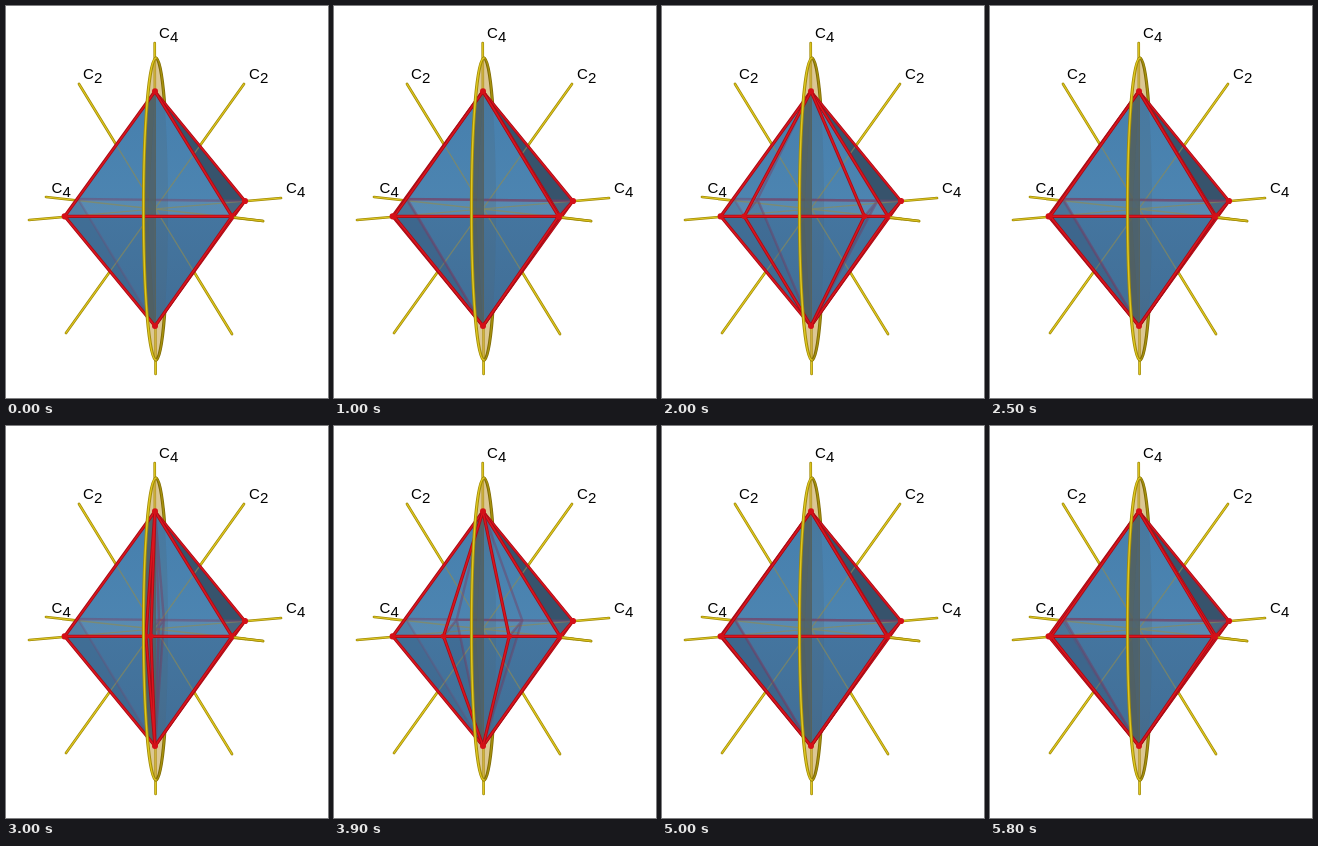
An HTML page for the animation above (5900 ms loop, 322 by 392 pixels).

```html
<!DOCTYPE html>
<html lang="en">
<head>
<meta charset="utf-8">
<title>Octahedron reflection</title>
<style>
  html, body { margin: 0; width: 100%; height: 100%; overflow: hidden; background: #fff; }
  svg { display: block; width: 322px; height: 392px; }
  text { font-family: "Liberation Sans", Arial, sans-serif; font-size: 15px; fill: #000; }
</style>
</head>
<body>
<svg id="stage" viewBox="0 0 322 392">
  <defs>
    <linearGradient id="upper" x1="0" y1="0" x2="0" y2="1">
      <stop offset="0" stop-color="#467fad"/><stop offset="1" stop-color="#4d85b1"/>
    </linearGradient>
    <linearGradient id="lower" x1="0" y1="0" x2="0" y2="1">
      <stop offset="0" stop-color="#44759f"/><stop offset="1" stop-color="#416e96"/>
    </linearGradient>
    <clipPath id="solid"><path d="M149 85L239 195L226 211L149 320L58.7 210Z"/></clipPath>
  </defs>
</svg>
<script>
const LOOP = 5900, STEP = 100;
const START = 920, PASS = 830, PASSES = 6;
const T = [149, 85.3], B = [149, 320];
const LF = [58.7, 210.3], RF = [226, 210.3], LB = [72, 193], RB = [239, 195];
const stage = document.getElementById("stage");

function add(tag, attrs, parent = stage) {
  const el = document.createElementNS("http://www.w3.org/2000/svg", tag);
  for (const k in attrs) el.setAttribute(k, attrs[k]);
  parent.appendChild(el);
  return el;
}
const group = (attrs = {}) => add("g", attrs);
const path = (...pts) => "M" + pts.map(p => p.join(" ")).join("L");
const fill = (d, color, opacity = 1) => add("path", { d, fill: color, "fill-opacity": opacity });
const line = (g, d, color, width, opacity = 1) => add("path", {
  d, fill: "none", stroke: color, "stroke-width": width, opacity,
  "stroke-linecap": "round", "stroke-linejoin": "round"
}, g);

// A shaded rod: dark body with a lighter core
function rod(g, d, dark, light, width) {
  const parts = [line(g, d, dark, width), line(g, d, light, width * 0.45)];
  return d2 => parts.forEach(p => p.setAttribute("d", d2));
}
const gold = (d, width = 2.7) => rod(stage, d, "#a18b08", "#e0c820", width);
const red = (g, d, width = 3.2) => rod(g, d, "#a80c16", "#dc141e", width);

const axes = [
  [[148.7, 37], [149.6, 368]],
  [[73, 78], [226, 328]],
  [[238, 78], [60, 327]],
  [[40, 191], [257, 215]],
  [[23, 214], [275, 192]]
];
const nearRim = "M150 52A12.5 151 0 0 0 150 354";
const farRim = "M150 52A12 151 0 0 1 150 354";

// Everything behind the solid
axes.forEach(a => gold(path(...a)));
fill(nearRim + "Z", "#c4a24e", 0.6);
fill(farRim + "Z", "#c4a24e", 0.6);
rod(stage, farRim, "#806c08", "#a8930c", 3.2);

// Solid faces
fill(path(T, LF, RF) + "Z", "url(#upper)");
fill(path(B, LF, RF) + "Z", "url(#lower)");
fill(path(T, RF, RB) + "Z", "#37536c");
fill(path(B, RF, RB) + "Z", "#3d5870");
fill(path(LF, LB, RB, RF) + "Z", "#7b9ab5", 0.25);
fill(path(LF, LB, B) + "Z", "#33506f", 0.2);

// Parts seen through the faces
const inner = group({ "clip-path": "url(#solid)" });
add("path", { d: farRim + "Z", fill: "#4d6675", "fill-opacity": 0.25 }, inner);
axes.forEach(a => line(inner, path(...a), "#8c8a55", 1.3, 0.65));
line(inner, path(LF, LB, RB, RF), "#75476f", 2.4, 0.5);
line(inner, path(LB, B, RB), "#75476f", 2.4, 0.3);
const ghost = group();
const ghostSides = add("path", { fill: "#2f4c69", "fill-opacity": 0.18 }, ghost);
const ghostLine = line(ghost, "", "#7a3358", 2.4, 0.4);

// Near half of the mirror disc
add("path", {
  d: nearRim + "Z", fill: "#545d58", "fill-opacity": 0.82, "clip-path": "url(#solid)"
});
fill(path(T, [142, 210], B, [150, 203]) + "Z", "#49647a", 0.4);

const edges = group();
red(edges, path(T, RB, B), 2.8);
red(edges, path(RF, RB), 3);
red(edges, path(LF, T, RF, B, LF, RF));

// Moving copy
const copy = group();
const setCopy = red(copy, "");
const dot = (g, p, r) => add("circle", { cx: p[0], cy: p[1], r, fill: "#d41018" }, g);
const movers = [dot(copy, LF, 2.8), dot(copy, RF, 2.8)];
[LF, RF, RB].forEach(p => dot(stage, p, 3.1));

gold(path([229, 211.5], [257, 215]));
gold(nearRim, 3.2);
[T, B].forEach(p => dot(stage, p, 3));

[["4", 153, 31.5], ["2", 77, 72.5], ["2", 243, 72.5], ["4", 45.5, 186.5], ["4", 280, 187]]
  .forEach(([n, x, y]) => {
    add("text", { x, y }).textContent = "C";
    add("text", { x: x + 11, y: y + 4 }).textContent = n;
  });

const ease = u => u < 0.5 ? 0.5 * (2 * u) ** 2.5 : 1 - 0.5 * (2 - 2 * u) ** 2.5;
const mix = (p, q, s) => p.map((c, i) => c + (q[i] - c) * s);

// Share of the way across the mirror; each pass goes the other way
function progress(t) {
  const n = (t - START) / PASS;
  if (n <= 0 || n >= PASSES) return 0;
  const s = ease(n % 1);
  return Math.floor(n) % 2 ? 1 - s : s;
}

function draw(now) {
  const t = Math.floor((now % LOOP) / STEP) * STEP;
  const s = progress(t);
  const moving = s > 0.001 && s < 0.999;
  copy.style.display = ghost.style.display = moving ? "" : "none";
  if (!moving) return;
  const lf = mix(LF, RF, s), rf = mix(RF, LF, s);
  const lb = mix(LB, RB, s), rb = mix(RB, LB, s);
  setCopy(path(T, lf, B, rf, T));
  ghostSides.setAttribute("d", path(lf, lb, B) + "Z" + path(rf, rb, B) + "Z");
  ghostLine.setAttribute("d", path(T, lb, B, rb, T) + path(lf, lb, rb, rf));
  [lf, rf].forEach((p, i) => {
    movers[i].setAttribute("cx", p[0]);
    movers[i].setAttribute("cy", p[1]);
  });
}

const start = performance.now();
function tick() {
  draw(performance.now() - start);
  requestAnimationFrame(tick);
}
tick();
</script>
</body>
</html>
```
